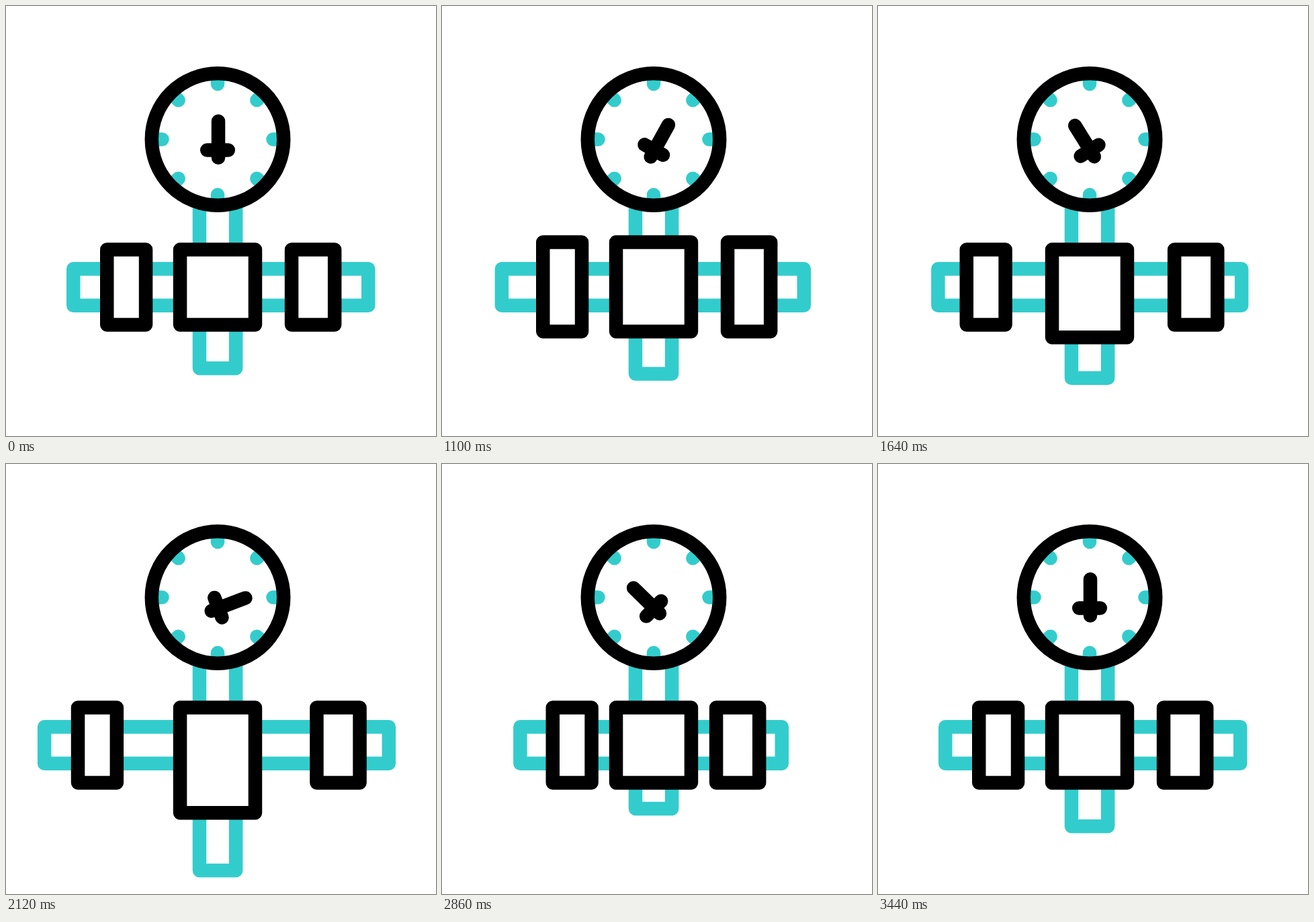
An HTML page that plays this animation: 640x640 px, repeating every 3.6 s.

```html
<!DOCTYPE html>
<html lang="en">
<head>
<meta charset="utf-8">
<title>Pressure gauge</title>
<style>
  html, body { margin: 0; width: 100%; height: 100%; overflow: hidden; background: #fff; }
  svg { display: block; width: 100%; height: 100%; }
  .teal, .black { stroke-width: 20.5; stroke-linecap: round; stroke-linejoin: round; }
  .teal { stroke: #3cc; fill: none; }
  .black { stroke: #000; fill: #fff; }
</style>
</head>
<body>
<svg viewBox="0 0 640 640">
  <path id="stem" class="teal"/>
  <path id="pipe" class="teal"/>
  <path id="left" class="black"/>
  <path id="right" class="black"/>
  <path id="middle" class="black"/>
  <circle cx="315" cy="198.5" r="98" fill="#fff"/>
  <g id="ticks" class="teal"></g>
  <circle cx="315" cy="198.5" r="98.2" class="black" style="fill:none"/>
  <path id="hand" class="black" d="M316 171.5V225.8M299.2 214.5H330.8"/>
</svg>
<script>
const LOOP = 3600;
const HALF = 10.25;
const $ = id => document.getElementById(id);

// Turning points of the two rhythms; both begin and end at rest
const BODY_BEATS = [290, 810, 1350, 2030, 2650, 3400];
const HAND_BEATS = [110, 400, 900, 1500, 2060, 2700, 3440];

const ease = u => u * u * (3 - 2 * u);
const clamp = u => Math.min(1, Math.max(0, u));

// Eased swing from rest through the given offsets and back to rest
function swing(t, beats, ...offsets) {
  let value = 0;
  [...offsets, 0].forEach((goal, i) => {
    const u = clamp((t - beats[i]) / (beats[i + 1] - beats[i]));
    value += (goal - (offsets[i - 1] || 0)) * ease(u);
  });
  return value;
}

// Outlined box given by its outer edges
function box(id, x1, y1, x2, y2) {
  $(id).setAttribute("d",
    `M${x1 + HALF} ${y1 + HALF}H${x2 - HALF}V${y2 - HALF}H${x1 + HALF}Z`);
}

function draw(t) {
  const move = (...offsets) => swing(t, BODY_BEATS, ...offsets);
  const grow = move(25, 0, 0, 0);
  const top = 352.2 - grow;
  const bottom = 484.8 + grow * 0.9;
  const dl = move(0, 0, -47, 18);
  const dr = move(0, 0, 41, -21);

  box("stem", 277.7, 270, 352.4, 549.4 + move(47.5, -22.5, 72, -32.5));
  box("pipe", 90 + move(-41.5, 12.5, -47, 20), 381, 549.5 + move(23.5, -19.5, 35, -41.5), 455.9);
  box("left", 140 + dl, top, 218.3 + dl, bottom);
  box("right", 414.8 + dr, top, 499.4 + dr, bottom);
  box("middle", 248.8, top, 381.2, bottom + move(0, 0, 47.5, 0));

  const angle = swing(t, HAND_BEATS, -28, 57.5, -51.5, 72.5, -52);
  $("hand").setAttribute("transform", `rotate(${angle} 316 214.7)`);
}

for (let i = 0; i < 8; i++) {
  const tick = document.createElementNS("http://www.w3.org/2000/svg", "path");
  tick.setAttribute("d", "M315 116V104");
  tick.setAttribute("transform", `rotate(${i * 45} 315 198.5)`);
  $("ticks").append(tick);
}

const start = performance.now();
function frame() {
  draw((performance.now() - start) % LOOP);
  requestAnimationFrame(frame);
}
frame();
</script>
</body>
</html>
```
